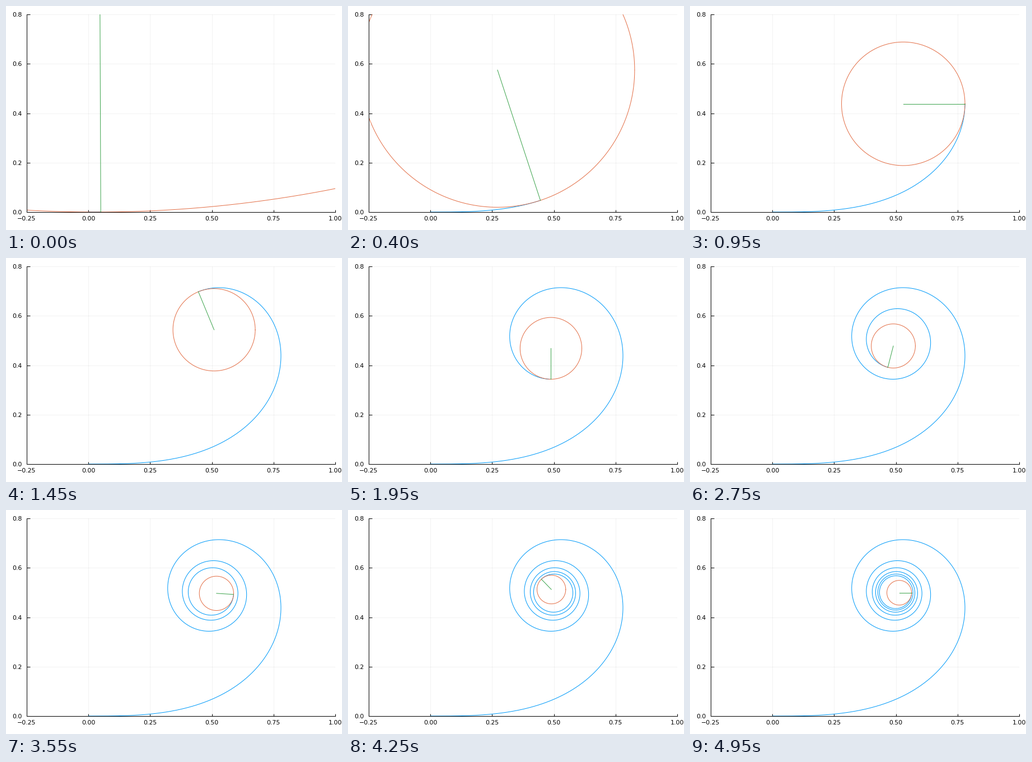
Recreate the animation shown at these times as a matplotlib script. Size 600 by 400 pixels, loop 5 s.

```python
import numpy as np
import matplotlib.pyplot as plt
from matplotlib.animation import FuncAnimation

W, H, DPI = 600, 400, 100
PX = 72 / DPI                                  # one pixel in points
LEFT, RIGHT, TOP, BOTTOM = 37, 588, 15, 368    # plot area in pixels
X_MIN, X_MAX, Y_MAX = -0.25, 1.0, 0.8
BLUE, ORANGE, GREEN = "#009af9", "#e36f47", "#3da44d"
FRAMES, STEP, SUB = 100, 0.05, 100             # time per frame, samples per frame

plt.rcParams["font.family"] = "DejaVu Sans"
fig = plt.figure(figsize=(W / DPI, H / DPI), dpi=DPI, facecolor="white")
ax = fig.add_axes([LEFT / W, 1 - BOTTOM / H, (RIGHT - LEFT) / W, (BOTTOM - TOP) / H])
ax.set_xlim(X_MIN, X_MAX)
ax.set_ylim(0, Y_MAX)

x_ticks = np.linspace(X_MIN, X_MAX, 6)
y_ticks = np.linspace(0, Y_MAX, 5)
ax.set_xticks(x_ticks, [])
ax.set_yticks(y_ticks, [])
ax.set_axisbelow(True)
ax.grid(color="black", alpha=0.1, linewidth=0.5 * PX)
ax.tick_params(direction="in", width=PX, color="black", zorder=3)
ax.tick_params(axis="x", length=4 * PX)
ax.tick_params(axis="y", length=6 * PX)
for side, spine in ax.spines.items():
    spine.set_visible(side in ("left", "bottom"))
    spine.set_linewidth(PX)
    spine.set_zorder(5)


def label(x, y, text, align):
    fig.text(x / W, 1 - y / H, text, ha=align, va="baseline", fontsize=11 * PX)


for v in x_ticks:
    x = LEFT + (v - X_MIN) / (X_MAX - X_MIN) * (RIGHT - LEFT)
    label(x, 383, f"{v:.2f}".replace("-", "\u2212"), "center")
for v in y_ticks:
    label(29, BOTTOM - v / Y_MAX * (BOTTOM - TOP) + 4, f"{v:.1f}", "right")

# Euler spiral: the heading grows with the square of time
dt = STEP / SUB
mid = (np.arange(FRAMES * SUB) + 0.5) * dt
heading = np.pi / 2 * mid ** 2
spiral_x = np.concatenate(([0], np.cumsum(np.cos(heading)) * dt))
spiral_y = np.concatenate(([0], np.cumsum(np.sin(heading)) * dt))
turn = np.arange(0, 2 * np.pi, 0.01)


def add_line(color, z):
    return ax.plot([], [], color=color, linewidth=PX, zorder=z)[0]


curve = add_line(BLUE, 2.1)
circle = add_line(ORANGE, 2.2)
radius = add_line(GREEN, 2.3)


def update(k):
    t = (k + 1) * STEP
    end = (k + 1) * SUB
    px, py = spiral_x[end], spiral_y[end]
    r = 1 / (4 * t)
    angle = np.pi / 2 * t ** 2
    cx, cy = px - r * np.sin(angle), py + r * np.cos(angle)
    curve.set_data(spiral_x[:end + 1:5], spiral_y[:end + 1:5])
    circle.set_data(cx + r * np.cos(turn), cy + r * np.sin(turn))
    radius.set_data([px, cx], [py, cy])
    return curve, circle, radius


anim = FuncAnimation(fig, update, frames=FRAMES, interval=50, repeat=True, repeat_delay=0)
plt.show()
```
